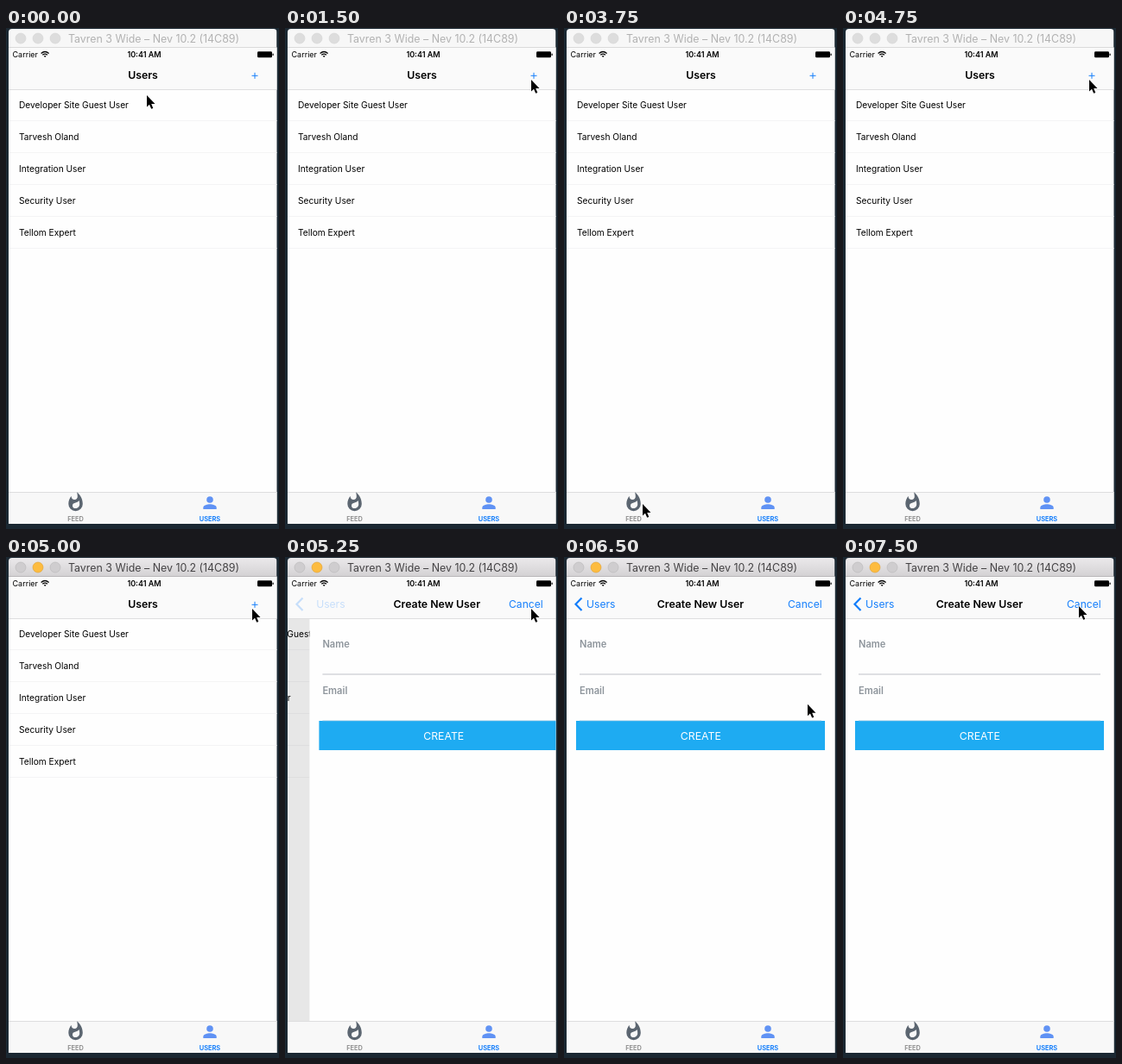
Write an HTML page that moves like this. It is 316 px wide and 581 px high and loops after 8 s.

```html
<!DOCTYPE html>
<html lang="en">
<head>
<meta charset="utf-8">
<title>Users</title>
<style>
  html, body { margin: 0; width: 100%; height: 100%; overflow: hidden; background: #1b2832; }
  svg { display: block; width: 100%; height: 100%; font-family: Inter, Roboto, sans-serif; }
  .row { font-size: 10.2px; }
  .label { font-size: 11.1px; font-weight: 600; fill: #8d949b; }
  .title { font-size: 12.3px; font-weight: 600; text-anchor: middle; }
  .link { font-size: 12.1px; fill: #147efb; }
  .tab { font-size: 7.4px; font-weight: 700; text-anchor: middle; }
  .status { font-size: 9px; }
  .rule { stroke: #f4f4f5; }
  .edge { stroke: #dededf; }

  #barFill { fill: #f7f7f7; }
  #barText { fill: #b2b2b2; }
  #barEdge { stroke: #dadada; }
  .light { fill: #ddd; stroke: #d4d4d4; stroke-width: .6; }
  .active #barFill { fill: url(#chrome); }
  .active #barText { fill: #454345; }
  .active #barEdge { stroke: #b9b7b9; }
  .active .light { fill: #cfcdcf; stroke: #b9b7b9; }
  .active .amber { fill: #fdbc40; stroke: #e0a030; }
</style>
</head>
<body>
<svg viewBox="0 0 316 581">
  <defs>
    <linearGradient id="chrome" x2="0" y2="1">
      <stop stop-color="#ebe9eb"/><stop offset="1" stop-color="#d3d1d3"/>
    </linearGradient>
    <clipPath id="window"><rect x="3" y="1" width="310.5" height="574"/></clipPath>
    <clipPath id="content"><rect x="3" y="72" width="311" height="466"/></clipPath>
  </defs>

  <rect width="316" height="581" fill="#1b2832"/>
  <g clip-path="url(#window)">
    <rect x="3" y="23" width="311" height="552" fill="#fefefe"/>

    <g id="windowBar">
      <path id="barFill" d="M3 23V5q0-4 4-4H309.500q4 0 4 4V23Z"/>
      <circle class="light" cx="17" cy="12" r="6"/>
      <circle class="light amber" cx="37" cy="12" r="6"/>
      <circle class="light" cx="57" cy="12" r="6"/>
      <text id="barText" x="72" y="16.600" font-size="12.400">Tavren 3 Wide – Nev 10.2 (14C89)</text>
      <path id="barEdge" d="M3 22.500H314"/>
    </g>

    <rect x="3" y="23" width="311" height="48" fill="#fafafa"/>
    <path class="edge" d="M3 71.500H314"/>
    <text class="status" x="7.500" y="34">Carrier</text>
    <path d="M40.600 29.400q4.500-3.800 9 0M42.300 31.300q2.800-2.300 5.600 0" fill="none" stroke="#000" stroke-width="1.300"/>
    <path d="M43.700 32.400q1.400-1 2.800 0L45.100 34Z"/>
    <text class="status" x="160" y="34" text-anchor="middle" font-weight="600">10:41 AM</text>
    <rect x="291" y="27.300" width="17" height="7" rx="1.400"/>
    <rect x="308.500" y="29.500" width="1.200" height="2.600" rx=".5"/>

    <g id="listBar">
      <text class="title" x="158.500" y="59">Users</text>
      <path d="M284.500 55.300h7M288 51.800v7" stroke="#147efb"/>
    </g>
    <g id="formBar">
      <g id="back">
        <path d="M20.500 47.500L13.500 54.700L20.500 62" fill="none" stroke="#147efb" stroke-width="2.200"/>
        <text id="backText" class="link" x="26" y="59">Users</text>
      </g>
      <text id="formTitle" class="title" x="158" y="59">Create New User</text>
      <text class="link" x="259" y="59">Cancel</text>
    </g>

    <g clip-path="url(#content)">
      <g id="list"></g>
      <rect id="dim" x="3" y="72" width="311" height="466"/>
      <g id="form">
        <rect x="3" y="72" width="311" height="466" fill="#fefefe"/>
        <text class="label" x="18" y="105">Name</text>
        <path d="M18 136H298" stroke="#d3d5da" stroke-width="1.300"/>
        <text class="label" x="18" y="158.700">Email</text>
        <rect x="14" y="190" width="288" height="34" fill="#1eabf2"/>
        <path d="M18 189.800H298" stroke="#a5cfe6" stroke-width=".8"/>
        <text x="158.300" y="211.700" font-size="12.300" fill="#fff" text-anchor="middle">CREATE</text>
      </g>
    </g>

    <rect x="3" y="538" width="311" height="37" fill="#f8f8f8"/>
    <path class="edge" d="M3 538.500H314"/>
    <path transform="translate(68.200 537.500) scale(1.030)" fill="#5b6570" d="M13.500.7s.7 2.600.7 4.800c0 2-1.300 3.700-3.400 3.700S7.200 7.500 7.200 5.500V5.100C5.200 7.500 4 10.600 4 14a8 8 0 0 0 16 0C20 8.600 17.400 3.800 13.500.7ZM11.700 19c-1.800 0-3.200-1.400-3.200-3.100 0-1.600 1-2.800 2.800-3.100 1.800-.4 3.600-1.200 4.600-2.600.4 1.300.6 2.600.6 4 0 2.700-2.100 4.800-4.800 4.800Z"/>
    <g fill="#6092f4">
      <circle cx="236" cy="547" r="3.800"/>
      <path d="M228.300 558v-2c0-2.600 5-3.800 7.700-3.800s7.700 1.200 7.700 3.800v2Z"/>
    </g>
    <text class="tab" x="80.500" y="572" fill="#929292">FEED</text>
    <text class="tab" x="236" y="572" fill="#147efb">USERS</text>
  </g>

  <path id="cursor" d="M0 0V13.500L3 10.800L5.200 15.800L7.300 14.900L5.200 9.900H9.500Z" stroke="#fff" stroke-width="1.200" paint-order="stroke" stroke-linejoin="round"/>
</svg>

<script>
const LOOP = 8000, STEP = 250, WIDTH = 311, OPEN = 5000;
const $ = id => document.getElementById(id);

const users = ['Developer Site Guest User', 'Tarvesh Oland', 'Integration User', 'Security User', 'Tellom Expert'];
$('list').innerHTML = users.map((name, i) => {
  const y = 93 + 37 * i;
  return `<text class="row" x="15" y="${y}">${name}</text><path class="rule" d="M3 ${y + 14.5}H314"/>`;
}).join('');

// The pointer rests between eased moves from one spot to the next.
const home = { x: 163, y: 78 }, add = { x: 285, y: 60 }, feed = { x: 91, y: 552 };
const submit = { x: 283, y: 184 }, cancel = { x: 273, y: 57 };
const moves = [
  { to: add, from: 0, until: 1250 },
  { to: feed, from: 2500, until: 3750 },
  { to: add, from: 3750, until: 4750 },
  { to: submit, from: 5250, until: 5500 },
  { to: cancel, from: 6250, until: 7500 }
];

const clamp = k => Math.min(1, Math.max(0, k));
const ease = k => k * k * (3 - 2 * k);

function pointerAt(t) {
  let { x, y } = home;
  for (const { to, from, until } of moves) {
    const k = ease(clamp((t - from) / (until - from)));
    x += (to.x - x) * k;
    y += (to.y - y) * k;
  }
  return [x, y];
}

// Share of the push transition still to go: 1 = list, 0 = form
const remaining = t => clamp(Math.exp(-15 * ((t - OPEN) / 1000 - 0.083)));

const shift = (id, x, y = 0) => $(id).setAttribute('transform', `translate(${x} ${y})`);
const show = (id, visible) => $(id).style.display = visible ? '' : 'none';

function draw(t) {
  const left = remaining(t), offset = left * WIDTH, opened = left < 1;
  $('windowBar').classList.toggle('active', t >= OPEN);
  shift('list', -0.3 * (WIDTH - offset));
  shift('form', offset);
  shift('formTitle', offset * 0.7);
  shift('backText', offset * 0.4);
  $('dim').style.opacity = 0.1 * (1 - left);
  $('back').style.opacity = left > 0.02 ? 0.22 : 1;
  show('listBar', !opened);
  show('formBar', opened);
  shift('cursor', ...pointerAt(t));
}

const start = performance.now();
function tick() {
  const t = (performance.now() - start) % LOOP;
  draw(Math.floor(t / STEP) * STEP);
  requestAnimationFrame(tick);
}
tick();
</script>
</body>
</html>
```
